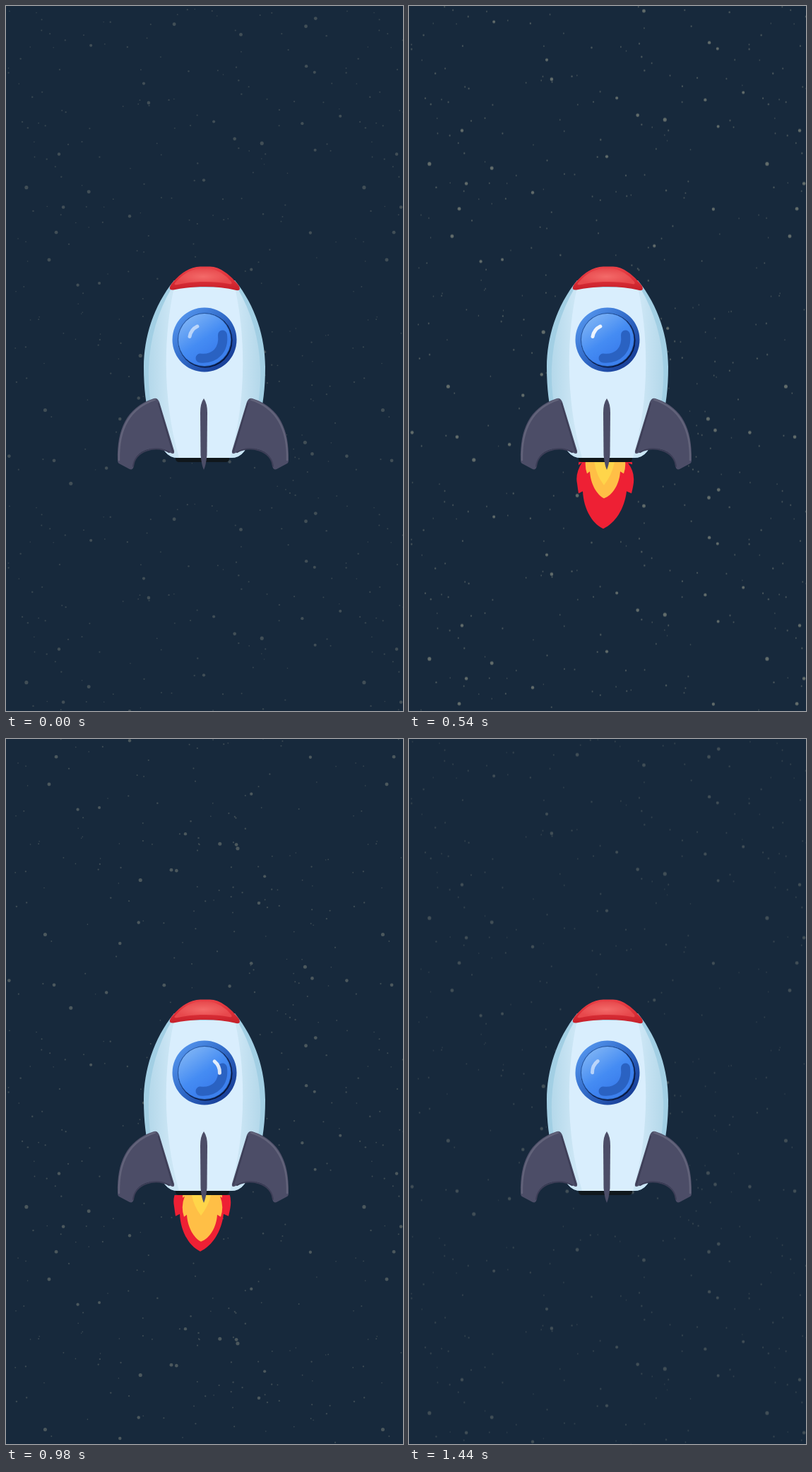
Animation of 562x997 px, one loop 1460 ms. Source, as an HTML page:

```html
<!DOCTYPE html>
<html lang="en">
<head>
<meta charset="utf-8">
<title>Rocket</title>
<style>
html, body { margin: 0; width: 100%; height: 100%; overflow: hidden; background: #17293c; }
svg { display: block; width: 562px; height: 997px; }
</style>
</head>
<body>
<svg viewBox="0 0 562 997">
  <defs>
    <pattern id="sky" width="478" height="700" patternUnits="userSpaceOnUse"></pattern>
    <clipPath id="belowNozzle"><path d="M0 645H562V997H0Z"/></clipPath>
    <clipPath id="hull"><use href="#body"/></clipPath>
    <linearGradient id="side">
      <stop offset="0" stop-color="#b4d8ea"/><stop offset=".2" stop-color="#cce6f5"/>
      <stop offset=".8" stop-color="#cce6f5"/><stop offset="1" stop-color="#b4d8ea"/>
    </linearGradient>
    <linearGradient id="rim" x1=".1" y1=".1" x2=".9" y2=".9">
      <stop stop-color="#5596ee"/><stop offset=".5" stop-color="#2f68c6"/><stop offset="1" stop-color="#163a92"/>
    </linearGradient>
    <linearGradient id="glass" x1=".15" y1=".1" x2=".6" y2=".75">
      <stop stop-color="#7cb2f5"/><stop offset=".65" stop-color="#458cf3"/><stop offset="1" stop-color="#3c80ee"/>
    </linearGradient>
    <linearGradient id="cap" x2="0" y2="1">
      <stop stop-color="#ea4147"/><stop offset=".55" stop-color="#dd3038"/><stop offset="1" stop-color="#c41f29"/>
    </linearGradient>
    <radialGradient id="capShine">
      <stop stop-color="#f36a69"/><stop offset="1" stop-color="#e7484c"/>
    </radialGradient>
    <linearGradient id="mist" gradientUnits="userSpaceOnUse" x1="0" y1="710" x2="0" y2="774">
      <stop stop-color="#7ba4d6" stop-opacity="0"/><stop offset=".4" stop-color="#7ba4d6" stop-opacity=".45"/>
      <stop offset=".75" stop-color="#7ba4d6"/>
    </linearGradient>
    <g id="fin">
      <path fill="#4c4d67" d="M208 555.5Q214 553 217 560L238 629Q239 635 233 632C213 620 182 626 181 650Q180 657 175 655L160 647Q158 646 158 642C157 600 170 568 208 555.5Z"/>
      <path fill="none" stroke="#62637a" stroke-width="2.5" stroke-linecap="round" d="M160 642C159 601 173 569 211 556.5"/>
      <path fill="none" stroke="#3d3e57" stroke-width="2" stroke-linecap="round" d="M216 562L236 630M231 631C212 621 183 628 180 651"/>
    </g>
  </defs>

  <path fill="#17293c" d="M0 0H562V997H0Z"/>
  <path id="stars" fill="url(#sky)" d="M0 0H562V997H0Z"/>

  <path id="smoke" fill="url(#mist)" d="M271 708H291V735C291 750 297 756 312 756Q325 756 342 749Q318 774 285 774Q252 774 233 754Q250 758 260 755C269 752 271 746 271 735Z"/>

  <g clip-path="url(#belowNozzle)">
    <path id="red" fill="#ee2034" d="M252-120Q240-105 240-90L245-94Q235-78 238-64Q239-56 240-50L246-53C247-30 258-8 275 0C292-8 305-28 308-53L315-50Q319-66 318-72Q318-82 310-93L316-91Q316-105 306-118Z"/>
    <g id="orange">
      <path fill="#ffbf46" d="M262-88Q250-76 250-62L253-64Q247-50 252-35L256-38C257-20 266-5 276 0C288-4 298-20 299-38L304-35Q309-50 303-64L306-62Q306-76 296-88Z"/>
      <path fill="#e8452f" d="M270-87Q268-70 273-60Q271-75 275-87Z"/>
    </g>
    <path id="yellow" fill="#ffd54a" d="M262-50Q260-20 276 0Q292-20 293-50Z"/>
  </g>

  <path fill="#10171c" d="M240 637H316V641Q315 645 311 645H245Q241 645 240 641Z"/>
  <path id="body" fill="#a2cfe4" d="M238 388C208 425 195 470 195 511C195 570 208 610 225 630Q232 639 243 639H319Q330 639 337 630C354 610 367 570 367 511C367 470 354 425 324 388Z"/>
  <g clip-path="url(#hull)">
    <path fill="url(#side)" d="M235 398C192 470 192 560 228 639H334C370 560 370 470 327 398Z"/>
    <path fill="#d9eefd" d="M238 398C222 470 222 560 245 639H317C340 560 340 470 324 398Z"/>
  </g>
  <path fill="url(#cap)" d="M232 400Q231 397 235 392C247 377 262 368 276 368.5H288C302 368 318 380 330 396Q333 403 326 402C297 395 265 396 237 401.5Q233 402 232 400Z"/>
  <path fill="url(#capShine)" d="M239 392Q255 373 274 371H288Q306 374 319 390Q321 394 316 393C295 389 265 389 243 394Q237 395 239 392Z"/>

  <circle cx="281" cy="472" r="45.5" fill="url(#rim)"/>
  <circle cx="282" cy="473" r="38.5" fill="#071640"/>
  <circle cx="281" cy="472" r="38" fill="#24559f"/>
  <circle cx="281" cy="472" r="37" fill="url(#glass)"/>
  <path fill="none" stroke="#2a62c2" stroke-width="13" stroke-linecap="round" d="M306.5 465C309 486 296 500 275 498"/>
  <path id="glint" fill="none" stroke="#fff" stroke-width="5" stroke-linecap="round" d="M272 452.5Q281 448 290 452.5"/>

  <use href="#fin"/>
  <use href="#fin" transform="matrix(-1 0 0 1 558 0)"/>
  <path fill="#4c4d67" d="M280 555Q285 562 285 575L284.5 635Q283 650 280 656Q277 650 275.5 635L275 575Q275 562 280 555Z"/>
</svg>
<script>
const LOOP = 1460, STEP = 20, NOZZLE = 640, TILE = 700;
const { PI, sin, cos, max, sqrt } = Math;
const el = id => document.getElementById(id);

let seed = 7;
function random() {
  seed = seed * 16807 % 2147483647;
  return seed / 2147483647;
}

let sky = '';
for (let i = 0; i < 290; i++) {
  const r = i < 48 ? 2 + random() * .6 : .7 + random() * .5;
  sky += `<circle cx="${3 + random() * 472}" cy="${3 + random() * 694}" r="${r}" opacity="${r > 2 ? 1 : .75}"/>`;
}
el('sky').innerHTML = `<g fill="#f3edc4">${sky}</g>`;

// Half a sine wave that starts at 0 ms and lasts the given time.
const hump = (t, length) => t > 0 && t < length ? sin(PI * t / length) : 0;

function glintAngle(t) {
  const sway = 540;
  return t < sway
    ? -53 + 48 * hump(t, sway)
    : -53 + 360 * ((t - sway) / (LOOP - sway)) ** 1.5;
}

function draw(now) {
  const t = Math.floor(now % LOOP / STEP) * STEP;
  const p = t / LOOP;
  const swell = hump(t, LOOP) ** 2.4;
  const flicker = 1 + .23 * cos(2 * PI * (t - 290) / 570);
  const flames = {
    red: 122 * swell,
    orange: 78 * hump(t, LOOP) * flicker,
    yellow: 48 * sqrt(hump(t, 1150)) * flicker
  };
  for (const id in flames)
    el(id).setAttribute('transform', `translate(0 ${NOZZLE + flames[id]})`);

  const scroll = 2 * TILE * (1 - (1 - p) ** 1.4);
  el('sky').setAttribute('patternTransform', `translate(0 ${scroll % TILE})`);
  el('stars').setAttribute('opacity', .19 + .17 * sin(PI * sqrt(p)) ** 2);
  el('smoke').setAttribute('opacity', max(0, hump(t - 100, 420)));
  el('glint').setAttribute('transform', `rotate(${glintAngle(t)} 281 472)`);
  el('glint').setAttribute('opacity', .57 + .4 * swell);
}

const start = performance.now();
function tick() {
  draw(performance.now() - start);
  requestAnimationFrame(tick);
}
tick();
</script>
</body>
</html>
```
